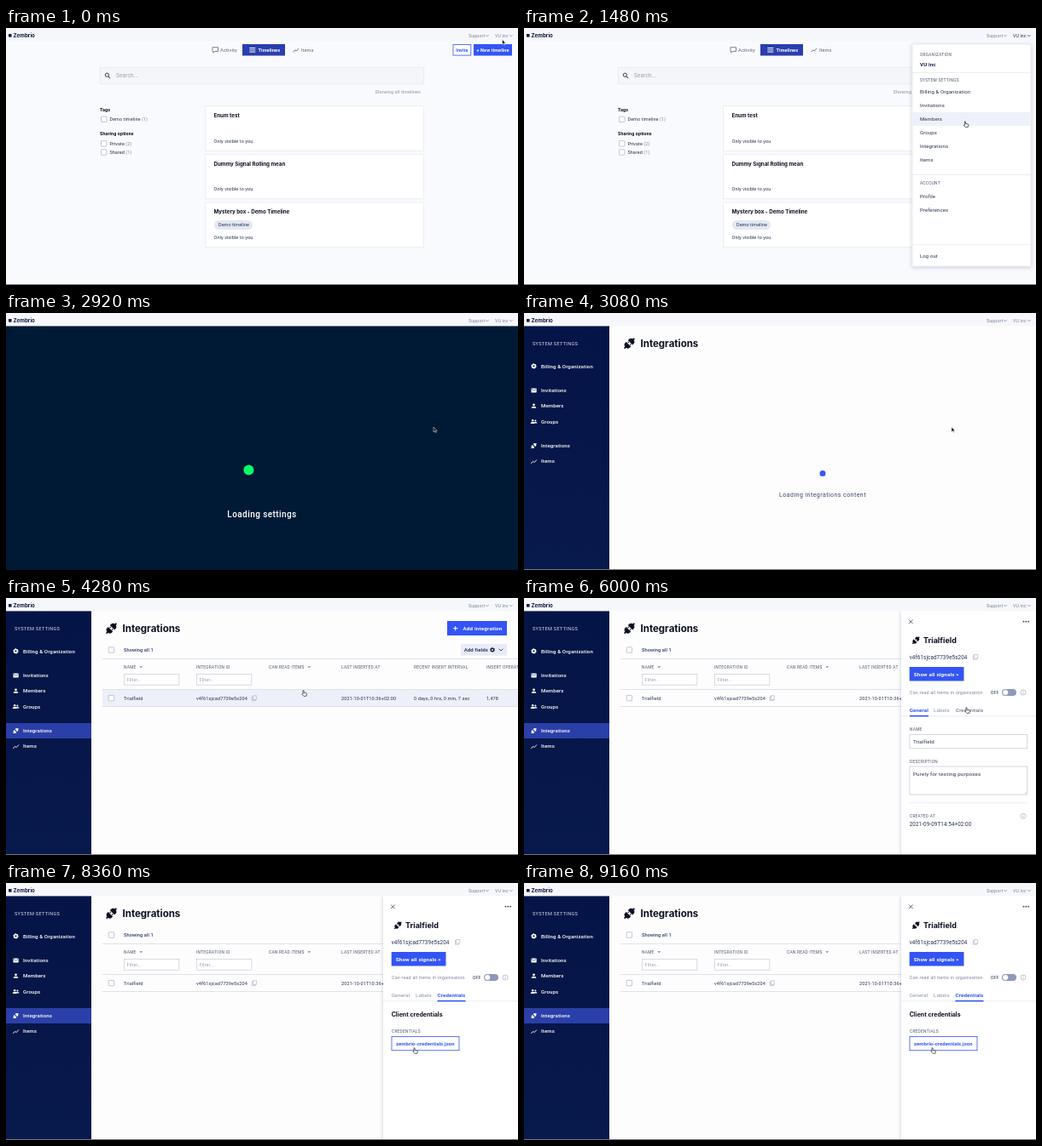
An HTML page for the animation above (9.2 s loop, 600 by 302 pixels).

```html
<!DOCTYPE html>
<html lang="en">
<head>
<meta charset="utf-8">
<title>Integration credentials</title>
<style>
html, body { margin: 0; width: 100%; height: 100%; overflow: hidden; background: #fdfdfe; }
svg { display: block; width: 100vw; height: 100vh; }
text { font-family: Roboto, sans-serif; letter-spacing: .1px; white-space: pre; }
.inter { font-family: Inter, sans-serif; letter-spacing: 0; }
.caps { letter-spacing: .27px; }
</style>
</head>
<body>
<svg id="stage" viewBox="0 0 600 302" xmlns="http://www.w3.org/2000/svg"></svg>
<script>
const LOOP = 9200;
const NAVY = '#14204a', INK = '#26304f', GREY = '#80869a', BLUE = '#3355f5', LINE = '#dfe2ea';
const BRAND = 'Zembrio', ORG = 'VU inc', ITEM = 'Trialfield', KEY = 'v4f61sjcad7739e5s204';

const text = (x, y, s, size, fill = INK, weight = 400, extra = '') =>
  `<text x="${x}" y="${y}" font-size="${size}" fill="${fill}" font-weight="${weight}" ${extra}>${s}</text>`;
const title = (x, y, s, size, fill = '#0c1020') => text(x, y, s, size, fill, 700, 'class="inter"');
const caps = (x, y, s) => text(x, y, s, 4.8, '#4b546d', 400, 'class="caps"');
const spaced = ls => `style="letter-spacing:${ls}px"`;
const rect = (x, y, w, h, fill, stroke = 'none', extra = '') =>
  `<rect x="${x}" y="${y}" width="${w}" height="${h}" fill="${fill}" stroke="${stroke}" stroke-width=".8" ${extra}/>`;
const path = (d, stroke, width = .8, fill = 'none', extra = '') =>
  `<path d="${d}" fill="${fill}" stroke="${stroke}" stroke-width="${width}" ${extra}/>`;
const group = (id, body, extra = '') => `<g id="${id}" ${extra}>${body}</g>`;
const place = (x, y, scale, body) => `<g transform="translate(${x} ${y}) scale(${scale})">${body}</g>`;

const chevron = (x, y, c = GREY, k = 1) => path(`M${x - 1.7 * k} ${y - .8 * k}l${1.7 * k} ${1.7 * k} ${1.7 * k} ${-1.7 * k}`, c, .8);
const box = (x, y, s = 6.4) => rect(x, y, s, s, '#fff', '#b4b9c7', 'rx=".6"');
const copy = (x, y) => path(`M${x + 1.2} ${y}h4v4.6h-4zM${x + 1.2} ${y + 1.2}h-1.2v4.6h4v-1.2`, '#a4aabb', .6);
const info = (x, y) => `<circle cx="${x}" cy="${y}" r="3" fill="none" stroke="#9aa0b2" stroke-width=".6"/>` +
  path(`M${x} ${y - .4}v2M${x} ${y - 1.7}v.7`, '#9aa0b2', .7);
const zigzag = (x, y, c) => path(`M${x} ${y + 2.3}l2.2-2.5 1.6 1.2 2.8-3.1`, c, .9);

function plug(x, y, size, c) {
  const half = `<path d="M-4.4-1.6V-3.4a4.4 4 0 0 1 8.8 0V-1.6z" fill="${c}"/>` + path('M0-6V-9.5', c, 2.2);
  return place(x, y, size / 14, `<g transform="rotate(45)">${half}<g transform="rotate(180)">${half}${path('M-2-1V.9M2-1V.9', c, 1.3)}</g></g>`);
}
function gear(x, y, r, c) {
  return `<circle cx="${x}" cy="${y}" r="${r * .6}" fill="none" stroke="${c}" stroke-width="${r * .5}"/>` +
    `<circle cx="${x}" cy="${y}" r="${r * .88}" fill="none" stroke="${c}" stroke-width="${r * .3}" stroke-dasharray="${r * .46}"/>`;
}
const person = (x, y, c, k = 1) => place(x, y, k,
  `<circle cy="-1.4" r="1.4" fill="${c}"/><path d="M-2.7 2.6V1.7Q-2.4.5 0 .5T2.7 1.7v.9z" fill="${c}"/>`);

function topBar() {
  return rect(0, 0, 600, 15.4, '#f6f7fb') + rect(3, 7, 3.6, 3.6, NAVY) + title(8.5, 11.2, BRAND, 6.2, '#0c1538') +
    text(542, 11, 'Support', 5.3, GREY) + chevron(564, 9) +
    group('org', text(573, 11, ORG, 5.3, 'currentColor') + chevron(591.8, 9, 'currentColor'));
}

function card(y, name, tag) {
  return rect(233.5, y, 256, 52.5, '#fff', '#e8eaf1') + title(243.5, y + 13.2, name, 6.2) +
    (tag ? rect(244, y + 21, 45, 11, '#e3e8f3', 'none', 'rx="5.5"') + text(249, y + 28.4, tag, 5.4) : '') +
    text(243.5, y + 42.7, 'Only visible to you', 5.5);
}
function filter(y, name, n) {
  return box(111.5, y - 5.1) + text(121.5, y, `${name} <tspan fill="${GREY}">(${n})</tspan>`, 5.4);
}

function timelines() {
  return rect(0, 15, 600, 287, '#f9fafd') +
    path('M242 22.7h6.5v4.8h-4l-1.6 1.7v-1.7h-.9z', '#5d657b', .8) + text(251, 27.7, 'Activity', 5.8, '#5d657b') +
    rect(277, 19, 50, 13.5, '#2a3eae') + path('M285.3 23.5h7M285.3 25.8h7M285.3 28.1h7', '#fff', 1) +
    text(295.5, 27.7, 'Timelines', 5.6, '#fff', 700) +
    zigzag(336.5, 26, '#5d657b') + text(346, 27.7, 'Items', 5.6, '#5d657b') +
    rect(524, 19.4, 20.8, 12.7, '#fff', BLUE) + text(527.2, 27.8, 'Invite', 5.5, BLUE, 700) +
    rect(548, 19, 45, 13.5, BLUE) + text(551.5, 27.8, '+ New timeline', 5.5, '#fff', 700) +
    rect(110.3, 46.3, 379.4, 19.5, '#f5f6fa', '#e6e8ef') +
    '<circle cx="118.4" cy="55.2" r="2.1" fill="none" stroke="#20263a" stroke-width=".9"/>' + path('M120 56.8l2.2 2.3', '#20263a', 1) +
    text(129, 58.2, 'Search...', 6.5, '#9a9fad') +
    text(486, 76.8, 'Showing all timelines', 5.4, '#a0a5b3', 500, 'text-anchor="end"') +
    text(110, 97.6, 'Tags', 5.4, '#0c1020', 700) + filter(109.2, 'Demo timeline', 1) +
    text(110, 126.2, 'Sharing options', 5.4, '#0c1020', 700) + filter(137.7, 'Private', 2) + filter(147.9, 'Shared', 1) +
    card(91.8, 'Enum test') + card(148.3, 'Dummy Signal Rolling mean') +
    card(205, 'Mystery box - Demo Timeline', 'Demo timeline');
}

function menu() {
  const rows = ['Billing &amp; Organization', 'Invitations', 'Members', 'Groups', 'Integrations', 'Items'];
  return rect(455, 19, 139, 261, '#fff', '#e1e4ec', 'filter="url(#soft)"') +
    caps(464, 33, 'ORGANIZATION') + text(464, 45, ORG, 6.2, NAVY, 700) + path('M455 52.5h139', LINE, .6) +
    group('rowHover', rect(455.4, -8, 138.2, 16, '#eef1fa')) + caps(464, 63, 'SYSTEM SETTINGS') +
    rows.map((s, i) => text(464, 77 + 16 * i, s, 6)).join('') +
    path('M455 172.5h139', LINE, .6) + caps(464, 184, 'ACCOUNT') +
    text(464, 200, 'Profile', 6) + text(464, 216, 'Preferences', 6) +
    path('M455 254.5h139', LINE, .6) + text(464, 270, 'Log out', 6);
}

function sidebar() {
  const link = (y, s) => text(20, y, s, 6.1, '#fff', 500);
  return rect(0, 15, 100, 287, 'url(#navy)') +
    text(10, 37.8, 'SYSTEM SETTINGS', 5.6, '#d7dcec', 400, spaced(.3)) +
    gear(11.5, 62.4, 3.1, '#fff') + link(64.6, 'Billing &amp; Organization') +
    rect(8.5, 88.6, 6.2, 4.8, '#fff', 'none', 'rx=".5"') + path('M9 89.4l2.6 1.9 2.6-1.9', '#07174a', .6) + link(93, 'Invitations') +
    person(11.5, 109.2, '#fff') + link(111.3, 'Members') +
    person(10.2, 127.6, '#fff', .9) + person(13.4, 127.6, '#fff', .75) + link(129.7, 'Groups') +
    group('active', rect(0, 147, 100, 18, '#2b3fa8')) +
    plug(11.5, 156, 6.2, '#fff') + link(158.1, 'Integrations') +
    zigzag(8.3, 174.6, '#fff') + link(176.4, 'Items');
}

function table() {
  const head = [[138, 'NAME'], [223, 'INTEGRATION ID'], [308, 'CAN READ ITEMS'], [393, 'LAST INSERTED AT'],
    [478, 'RECENT INSERT INTERVAL'], [563, 'INSERT OPERATIONS']];
  const cell = (x, s) => text(x, 119.5, s, 5.5, INK, 400, spaced(.12));
  const input = x => rect(x + .4, 89.4, 64.4, 12.8, '#fff', '#cdd1db') + text(x + 3.5, 97.7, 'Filter...', 5.5, '#9a9fad');
  const sort = x => `<path d="M${x} 80.3h3.6l-1.8 2z" fill="#7b8296"/>`;
  return rect(517, 27, 70, 17, BLUE) + path('M524 35.7h5.4M526.7 33v5.4', '#fff', 1) +
    text(535.5, 37.9, 'Add integration', 6.2, '#fff', 700, spaced(.2)) +
    rect(533, 54, 54, 13.6, '#e8ecf6') + text(536.7, 63, 'Add fields', 6, NAVY, 500) +
    gear(570, 60.9, 2.9, NAVY) + chevron(580, 60.8, NAVY, 1.4) +
    box(120.2, 57.8) + text(138, 62.9, 'Showing all 1', 5.6, '#2b3a6a', 500) +
    path('M113 71.5H600M113 107.5H600', LINE, 1) +
    group('row', rect(113, 108, 487, 19, '#edf0f9')) + path('M113 127.5H600', LINE, 1) +
    head.map(([x, s]) => caps(x, 83.4, s)).join('') + sort(156.5) + sort(353.5) +
    input(138) + input(223) + box(120.2, 114.4) +
    cell(138, ITEM) + cell(223, KEY) + copy(288.2, 114.8) + cell(393, '2021-10-01T10:36+02:00') +
    cell(478, '0 days, 0 hrs, 0 min, 7 sec') + cell(563, '1,478');
}

function panel() {
  const tab = (x, s, on, c = '#8790a6') => text(x, 134, s, 6.2, on ? BLUE : c, on ? 700 : 400);
  const bar = (x, w) => rect(x, 137.8, w, 1.6, BLUE);
  return rect(442, 15, 170, 287, '#fff', 'none', 'filter="url(#soft)"') +
    path('M451 25.5l4.6 4.6M455.6 25.5l-4.6 4.6', '#3a4259', .8) +
    [585.5, 588.3, 591.1].map(x => `<circle cx="${x}" cy="27.7" r=".9" fill="#3a4259"/>`).join('') +
    plug(459.3, 49.7, 8.4, '#0c1020') + title(468, 53, ITEM, 9) +
    text(451.7, 71.6, KEY, 6.3) + copy(526.5, 66.5) +
    rect(451.7, 81, 63.8, 16.5, BLUE) + text(456.8, 91.5, 'Show all signals &gt;', 6.2, '#fff', 700, spaced(.18)) +
    text(452, 113, 'Can read all items in organisation', 5.5, '#7f879c', 400, spaced(.12)) +
    text(546.7, 113, 'OFF', 5.4) + rect(560, 107, 17, 8, '#8e98b8', 'none', 'rx="4"') +
    '<circle cx="564.2" cy="111" r="3.5" fill="#fff" stroke="#7a84a5" stroke-width=".6"/>' + info(585, 111) +
    path('M442 138.9H600', LINE, .7) + tab(480, 'Labels') +
    group('general', tab(451.7, 'General', true) + tab(506, 'Credentials', false, '#4d566f') + bar(452, 22) +
      caps(452, 156.2, 'NAME') + rect(452, 160.4, 137.7, 16.4, '#fff', '#c9cdd8') + text(456, 170.8, ITEM, 6.2) +
      caps(452, 193.6, 'DESCRIPTION') + rect(452, 198, 137.7, 33, '#fff', '#c9cdd8') +
      text(456, 208.6, 'Purely for testing purposes', 6.2, INK, 400, spaced(.2)) + path('M587 230l2-2', '#9aa0b2', .5) +
      path('M452 240.8h138', LINE, .7) + caps(452, 258, 'CREATED AT') + info(585, 256.2) +
      text(451.7, 268.2, '2021-09-09T14:54+02:00', 6.3)) +
    group('credentials', tab(451.7, 'General') + tab(505.5, 'Credentials', true) + bar(505.5, 33) +
      title(451.7, 157.2, 'Client credentials', 7) + caps(452, 176, 'CREDENTIALS') +
      rect(452, 180.5, 79, 16.2, '#fff', BLUE) + text(457, 190.7, 'zembrio-credentials.json', 5.9, BLUE, 700));
}

// Both pointers have their hot spot at 0,0
const arrow = path('M0 0v5.8l1.4-1.2.9 2 .9-.4-.9-1.9h1.8z', '#fff', .5, '#111');
const hand = path('M1.4.5q.8-.5 1.1.4v2l2.7.6q.8.3.6 1.2L5.2 7H2.3L.3 4.9q.1-.8 1.1-.2z', '#222', .7, '#fff', 'transform="translate(-1.9 -.7)"');

const stage = document.getElementById('stage');
stage.innerHTML =
  '<defs><filter id="soft" x="-20%" y="-10%" width="140%" height="120%"><feDropShadow dx="0" dy="1" stdDeviation="2" flood-color="#1c2a55" flood-opacity=".22"/></filter>' +
  '<linearGradient id="navy" x2="0" y2="1"><stop stop-color="#051447"/><stop offset="1" stop-color="#08194b"/></linearGradient></defs>' +
  group('home', timelines()) +
  group('settings', rect(0, 15, 600, 287, '#fdfdfe') + sidebar() + plug(123.5, 35.7, 12.2, '#0c1020') + title(136.5, 39.6, 'Integrations', 11.5) +
    group('fetching', '<circle id="blueDot" cy="188.5" r="3.5" fill="#3a57f5"/>' +
      text(350, 216.4, 'Loading integrations content', 7, '#3a4560', 400, `text-anchor="middle" ${spaced(.45)}`)) +
    group('table', table())) +
  group('panel', panel()) +
  rect(0, 301, 600, 1, '#74777f') +
  group('loading', rect(0, 15, 600, 287, '#001a35') +
    text(300, 240.4, 'Loading settings', 10, '#fff', 500, `text-anchor="middle" ${spaced(.42)}`) +
    '<circle id="greenDot" cy="184.5" r="6" fill="#08ff68"/>') +
  topBar() +
  group('menu', menu()) +
  group('cursor', group('arrow', arrow) + group('hand', hand));

const el = {};
for (const node of stage.querySelectorAll('[id]')) el[node.id] = node;

const show = (id, on) => { el[id].style.display = on ? '' : 'none'; };
const clamp = v => Math.min(1, Math.max(0, v));
const ease = v => v * v * (3 - 2 * v);

const at = { hover: 80, menu: 480, loading: 2160, settings: 3040, table: 3520, panel: 4560, tab: 6200 };

// Each move: start, end, target x, target y
const moves = [[780, 1760, 501, 134], [3600, 4280, 348.5, 109], [5040, 5960, 518.5, 129], [6560, 7320, 478.5, 194]];
function pointer(t) {
  let x = 581.5, y = 13.5;
  for (const [a, b, tx, ty] of moves) {
    const k = ease(clamp((t - a) / (b - a)));
    x += (tx - x) * k;
    y += (ty - y) * k;
  }
  return [x, y];
}

// The dot starts in the middle and swings right first
const swing = (t, from, reach) => reach * Math.sin((t - from) / 160);

function draw(t) {
  const [x, y] = pointer(t);
  const inTable = t >= at.table, opened = t >= at.panel, creds = t >= at.tab;
  const overRow = inTable && !opened && y > 106 && y < 127 && x > 113;

  show('home', t < at.loading);
  show('menu', t > at.menu && t < at.loading);
  show('loading', t >= at.loading && t < at.settings);
  show('settings', t >= at.settings);
  show('fetching', !inTable);
  show('table', inTable);
  show('active', inTable);
  show('row', overRow);
  show('panel', opened);
  show('general', !creds);
  show('credentials', creds);

  el.menu.style.opacity = clamp((t - at.menu) / 80);
  const slide = 1 - Math.pow(1 - clamp((t - at.panel) / 320), 3);
  el.panel.setAttribute('transform', `translate(${165 * (1 - slide)} 0)`);

  const dark = t < at.loading ? clamp((t - at.hover) / 160) : 0;
  el.org.style.color = `rgb(${128 - 90 * dark},${134 - 86 * dark},${154 - 75 * dark})`;

  const row = Math.round((y - 75) / 16);
  show('rowHover', y > 67 && row >= 0 && row <= 5);
  el.rowHover.setAttribute('transform', `translate(0 ${75 + 16 * row})`);

  el.greenDot.setAttribute('cx', 300 + swing(t, at.loading - 30, 16));
  el.blueDot.setAttribute('cx', 350 + swing(t, at.settings + 40, 8));

  const onMenu = t >= 120 && t < at.loading + 80;
  const onTarget = overRow || (opened && t < 5120) || (t >= 5800 && t < 6720) || t >= 7200;
  show('hand', onMenu || onTarget);
  show('arrow', !(onMenu || onTarget));
  el.cursor.setAttribute('transform', `translate(${x} ${y})`);
}

let start;
function tick(now) {
  start ??= now;
  draw((now - start) % LOOP);
  requestAnimationFrame(tick);
}
draw(0);
requestAnimationFrame(tick);
</script>
</body>
</html>
```
